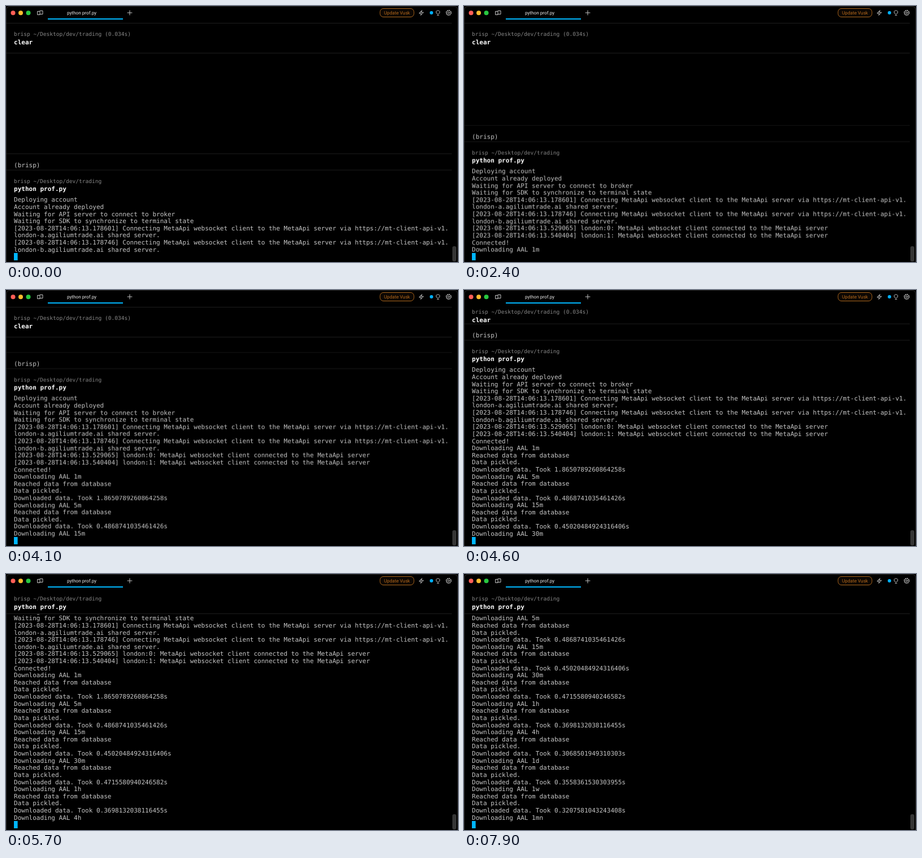
An HTML page that plays this animation: 800 px wide and 454 px high, repeating every 8 s.

```html
<!DOCTYPE html>
<html lang="en">
<head>
<meta charset="utf-8">
<title>Terminal</title>
<style>
  html, body { margin: 0; width: 100%; height: 100%; overflow: hidden; background: #000; }
  svg { display: block; width: 100%; height: 100%; }
  text { white-space: pre; text-rendering: geometricPrecision; }
  .mono { font: 11.03px "DejaVu Sans Mono", monospace; fill: #c6c6c6; }
  .command { font-weight: bold; fill: #fff; }
  .path { font-size: 9.55px; fill: #868686; }
  .ui { font: 8.2px Roboto, sans-serif; text-anchor: middle; }
  .rule { stroke: #1d1d1d; }
  .icon { fill: none; stroke: #c4c4c4; stroke-linecap: round; stroke-linejoin: round; }
</style>
</head>
<body>
<svg viewBox="0 0 800 454">
  <defs><clipPath id="viewport"><path d="M0 25H800V438.2H0Z"/></clipPath></defs>
  <rect width="800" height="454"/>
  <g clip-path="url(#viewport)">
    <g id="feed"></g>
    <g id="clear"></g>
    <g id="clearPushed"></g>
    <g id="pinned"></g>
  </g>
  <rect x="14" y="438" width="6.6" height="13" fill="#00b7ff"/>
  <rect x="790" y="426" width="7" height="27" rx="3" fill="#363636"/>

  <path d="M.5 454V8Q.5 .5 8 .5H792Q799.5 .5 799.5 8V454" fill="none" stroke="#2b2b2b"/>
  <g id="lights"></g>
  <path class="icon" d="M56 9.5H60V15.5H56ZM60 8.5H65V14.5H60"/>
  <text class="ui" x="134" y="15" fill="#eee">python prof.py</text>
  <rect x="74" y="22" width="133" height="2" fill="#00b7ff"/>
  <path class="icon" d="M219 8V16M215 12H223"/>
  <rect x="662" y="4.5" width="60" height="15" rx="6" fill="#0c0703" stroke="#a8641c"/>
  <text class="ui" x="692" y="15" fill="#b5691c">Update Vusk</text>
  <path class="icon" d="M736 8L731 13H735L734 16.5L739 11.3H735Z"/>
  <circle cx="753" cy="12" r="3" fill="#00b0ff"/>
  <path class="icon" d="M763 14C760 11.5 761 8 764.5 8S769 11.5 766 14ZM763.2 16.5H766"/>
  <g class="icon">
    <circle cx="783.5" cy="12" r="1.6"/>
    <circle cx="783.5" cy="12" r="4"/>
    <circle cx="783.5" cy="12" r="4.7" stroke-dasharray="1.7 2" stroke-linecap="butt"/>
  </g>
</svg>
<script>
const LOOP = 8000, ROW = 12.62, FIRST_BASELINE = 347.3, START_ROWS = 8;
const byId = id => document.getElementById(id);

function add(parent, tag, attrs, content = '') {
  const node = document.createElementNS('http://www.w3.org/2000/svg', tag);
  for (const name in attrs) node.setAttribute(name, attrs[name]);
  node.textContent = content;
  parent.append(node);
}
const write = (parent, y, content, style = '') =>
  add(parent, 'text', { x: 14, y, class: 'mono ' + style }, content);
const rule = (parent, y) =>
  add(parent, 'path', { d: `M1 ${y}H789`, class: 'rule' });

function heading(parent, y, command, suffix = '') {
  write(parent, y, 'brisp ~/Desktop/dev/trading' + suffix, 'path');
  write(parent, y + 14.8, command, 'command');
}

function connecting(stamp, region) {
  return [`[2023-08-28T14:06:13.${stamp}] Connecting MetaApi websocket client to the MetaApi server via https://mt-client-api-v1.`,
    `london-${region}.agiliumtrade.ai shared server.`];
}
const connected = (stamp, index) =>
  `[2023-08-28T14:06:13.${stamp}] london:${index}: MetaApi websocket client connected to the MetaApi server`;

const downloads = [
  ['1m', '1.8650789260864258'], ['5m', '0.4868741035461426'],
  ['15m', '0.45020484924316406'], ['30m', '0.4715580940246582'],
  ['1h', '0.3698132038116455'], ['4h', '0.3068501949310303'],
  ['1d', '0.3558361530303955'], ['1w', '0.3207581043243408']
];
const output = [
  'Deploying account', 'Account already deployed',
  'Waiting for API server to connect to broker',
  'Waiting for SDK to synchronize to terminal state',
  ...connecting('178601', 'a'), ...connecting('178746', 'b'),
  connected('529065', 0), connected('540404', 1), 'Connected!',
  ...downloads.flatMap(([span, seconds]) => [
    `Downloading AAL ${span}`, 'Reached data from database', 'Data pickled.',
    `Downloaded data. Took ${seconds}s`]),
  'Downloading AAL 1mn'
];

const { feed, clear, clearPushed, pinned } =
  Object.fromEntries(['feed', 'clear', 'clearPushed', 'pinned'].map(id => [id, byId(id)]));

rule(feed, 262);
write(feed, 285.9, '(brisp)');
rule(feed, 291);
heading(feed, 313.5, 'python prof.py');
output.forEach((line, i) => write(feed, FIRST_BASELINE + i * ROW, line));

rule(clear, 30.5);
heading(clear, 53.2, 'clear', ' (0.034s)');
rule(clear, 83.5);
heading(clearPushed, 42.3, 'clear', ' (0.034s)');

add(pinned, 'rect', { y: 24, width: 789, height: 47 });
heading(pinned, 46.8, 'python prof.py');
rule(pinned, 70.5);

['#ff5f57', '#febc2e', '#28c840'].forEach((fill, i) =>
  add(byId('lights'), 'circle', { cx: 12.5 + i * 13.5, cy: 12.3, r: 4, fill }));

// Each step is [start time, value]; values hold until the next step.
function play(node, property, steps) {
  const frames = [...steps, [LOOP, steps.at(-1)[1]]].map(([time, value]) =>
    ({ offset: time / LOOP, [property]: value, easing: 'steps(1, end)' }));
  node.animate(frames, { duration: LOOP, iterations: Infinity });
}

const rowsAt = [[0, 8], [400, 10], [1800, 12], [3600, 15], [3700, 16], [4100, 20],
  [4600, 24], [5000, 28], [5400, 29], [5500, 32], [5800, 36], [6100, 40], [6400, 44]];
play(feed, 'transform', rowsAt.map(([time, rows]) =>
  [time, `translateY(${(START_ROWS - rows) * ROW}px)`]));
play(clear, 'visibility', [[0, 'visible'], [4600, 'hidden']]);
play(clearPushed, 'visibility', [[0, 'hidden'], [4600, 'visible'], [5000, 'hidden']]);
play(pinned, 'visibility', [[0, 'hidden'], [5500, 'visible']]);
</script>
</body>
</html>
```
